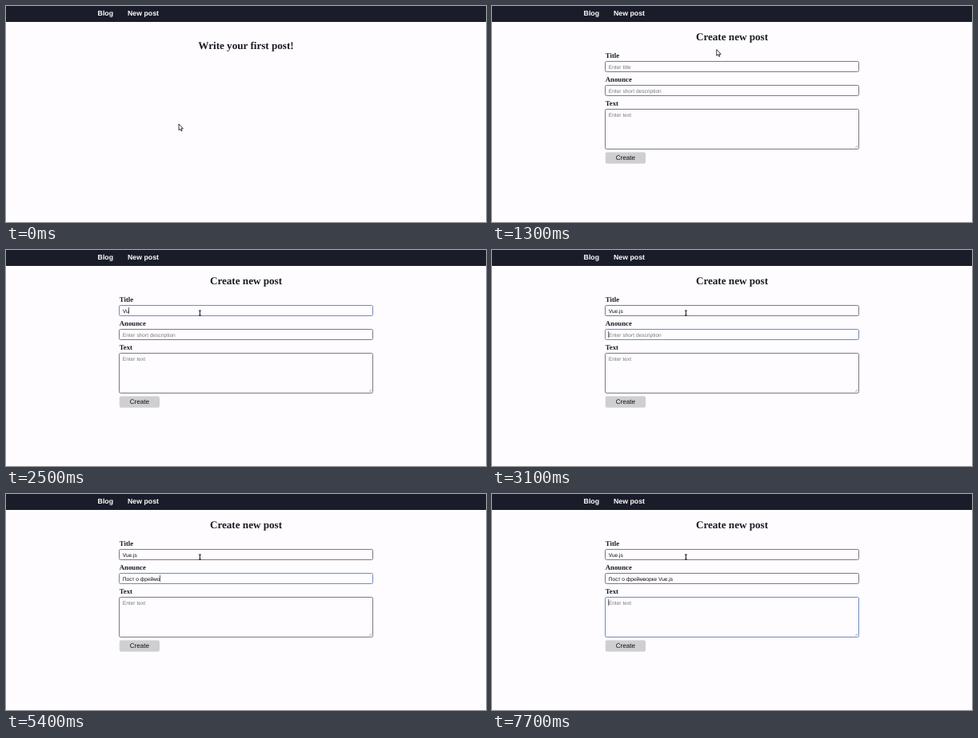
An HTML page for the animation above (8000 ms loop, 600 px wide and 271 px high).

```html
<!DOCTYPE html>
<html lang="en">
<head>
<meta charset="utf-8">
<title>Create new post</title>
<style>
  html, body { margin: 0; width: 100%; height: 100%; overflow: hidden; background: #fefcfe; }
  svg { display: block; width: 600px; height: 271px; }
  text { white-space: pre; text-rendering: geometricPrecision; fill: #1a1b27; }
  .nav { font: bold 8.77px "Liberation Sans", Arial, sans-serif; fill: #fff; }
  .head { font: bold 13.13px "Liberation Serif", "Times New Roman", serif; text-anchor: middle; }
  .label { font: bold 8.75px "Liberation Serif", "Times New Roman", serif; }
  .value { font: 6.6px "Liberation Sans", Arial, sans-serif; fill: #111; }
  .hint { fill: #77777b; }
  .button { font: 8.15px "Liberation Sans", Arial, sans-serif; text-anchor: middle; fill: #111; }
  .box { fill: #fefcfe; stroke: #7a7a80; stroke-width: 1; }
  .box.focus { stroke: #6f8ac2; }
  .caret { fill: #222; }
  .cursor { fill: #fff; stroke: #22222c; stroke-width: .9; stroke-linejoin: round; }
</style>
</head>
<body>
<svg viewBox="0 0 600 271">
  <rect width="600" height="271" fill="#fefcfe"/>
  <rect width="600" height="20" fill="#1a1d29"/>
  <text class="nav" x="114.6" y="12.3">Blog</text>
  <text class="nav" x="152" y="12.3">New post</text>

  <text id="first" class="head" x="300" y="54">Write your first post!</text>

  <g id="form">
    <text class="head" x="300" y="43.2">Create new post</text>
    <g id="fields"></g>
    <path d="M453.8 178L457 174.8M456 178L457 177" stroke="#77777b" stroke-width=".6"/>
    <rect x="141.8" y="183.6" width="50.2" height="14.2" rx="2" fill="#cfcfd1"/>
    <text class="button" x="166.9" y="193.4">Create</text>
    <rect id="caret" class="caret" width=".7" height="8"/>
  </g>

  <g id="cursor" class="cursor">
    <path id="arrow" d="M0 0V7.8L1.8 6.2L3 8.9L4.2 8.4L3 5.8H5.4Z"/>
    <path id="hand" d="M0 .4Q.7-.4 1.4.4V3L5 3.5Q6 3.8 5.8 5L5.2 7.8H.8L-1.6 4.8Q-1.2 3.8 0 4.6Z"/>
    <path id="beam" fill="none" stroke-width="1.1" d="M-1.5-3H1.5M0-3V3M-1.5 3H1.5"/>
  </g>
</svg>
<script>
const LOOP = 8000, STEP = 100, FORM_AT = 1200, TEXT_X = 145.8;
const $ = id => document.getElementById(id);

function el(tag, attrs, parent) {
  const node = document.createElementNS("http://www.w3.org/2000/svg", tag);
  for (const k in attrs) node.setAttribute(k, attrs[k]);
  return parent.appendChild(node);
}

// [time, text so far]
const titleTyping = [[0, ""], [2300, "V"], [2500, "Vu"], [2600, "Vue"], [2900, "Vue.js"]];
const announceTyping = [
  [0, ""], [3600, "G"], [3700, "Gj"], [3800, "Gjc"], [3900, "Gjcn"], [4100, ""],
  [4400, "П"], [4500, "По"], [4600, "Пос"], [4700, "Пост"], [4800, "Пост о"],
  [5000, "Пост о ф"], [5100, "Пост о фре"], [5300, "Пост о фрейм"], [5400, "Пост о фреймо"],
  [5900, "Пост о фреймв"], [6300, "Пост о фреймво"], [6500, "Пост о фреймвор"],
  [6600, "Пост о фреймворк"], [6700, "Пост о фреймворке"], [6900, "Пост о фреймворке V"],
  [7000, "Пост о фреймворке Vu"], [7100, "Пост о фреймворке Vue"],
  [7200, "Пост о фреймворке Vue."], [7300, "Пост о фреймворке Vue.j"],
  [7500, "Пост о фреймворке Vue.js"]
];
const focusSteps = [[0, -1], [2000, 0], [3100, 1], [7700, 2]];

// [time, x, y]
const path = [[0, 216, 148], [200, 216, 148], [1000, 283, 53], [FORM_AT, 283, 53],
              [1900, 242.4, 81], [2000, 242.4, 81], [2100, 242.4, 79]];

const fields = [
  ["Title", "Enter title", 69.5, 13, titleTyping],
  ["Anounce", "Enter short description", 99.5, 13, announceTyping],
  ["Text", "Enter text", 129.5, 50, [[0, ""]]]
].map(([label, hint, y, height, typing]) => {
  const root = $("fields");
  el("text", { class: "label", x: 141.8, y: y - 4.3 }, root).textContent = label;
  const box = el("rect", { class: "box", x: 141.5, y, width: 317, height, rx: 1.8 }, root);
  const text = el("text", { x: TEXT_X, y: y + 9.3 }, root);
  return { hint, y, typing, box, text };
});

const at = (steps, t) => steps.filter(s => s[0] <= t).pop()[1];
const ease = p => p * p * (3 - 2 * p);

function pointer(t) {
  const i = path.findIndex(p => p[0] > t);
  if (i < 0) return path[path.length - 1].slice(1);
  const [t0, x0, y0] = path[i - 1], [t1, x1, y1] = path[i];
  const p = ease((t - t0) / (t1 - t0));
  return [x0 + (x1 - x0) * p, y0 + (y1 - y0) * p];
}

const show = (node, on) => node.style.display = on ? "" : "none";

function render(t) {
  const onForm = t >= FORM_AT;
  const [x, y] = pointer(t);
  const hover = !onForm && y < 58;
  const overInput = onForm && y > 70 && y < 83;

  show($("first"), !onForm);
  show($("form"), onForm);
  $("first").style.fill = hover ? "#43454f" : "";

  $("cursor").setAttribute("transform", `translate(${x} ${y})`);
  show($("hand"), hover);
  show($("beam"), overInput);
  show($("arrow"), !hover && !overInput);

  const focus = at(focusSteps, t);
  show($("caret"), focus >= 0);
  fields.forEach((f, i) => {
    const value = at(f.typing, t);
    f.text.textContent = value || f.hint;
    f.text.setAttribute("class", value ? "value" : "value hint");
    f.box.setAttribute("class", i === focus ? "box focus" : "box");
    if (i === focus) {
      const width = value ? f.text.getComputedTextLength() : 0;
      $("caret").setAttribute("x", TEXT_X - .4 + width);
      $("caret").setAttribute("y", f.y + 2.5);
    }
  });
}

const start = performance.now();
let last = -1;
function tick() {
  const t = Math.floor((performance.now() - start) % LOOP / STEP) * STEP;
  if (t !== last) render(last = t);
  requestAnimationFrame(tick);
}
tick();
</script>
</body>
</html>
```
